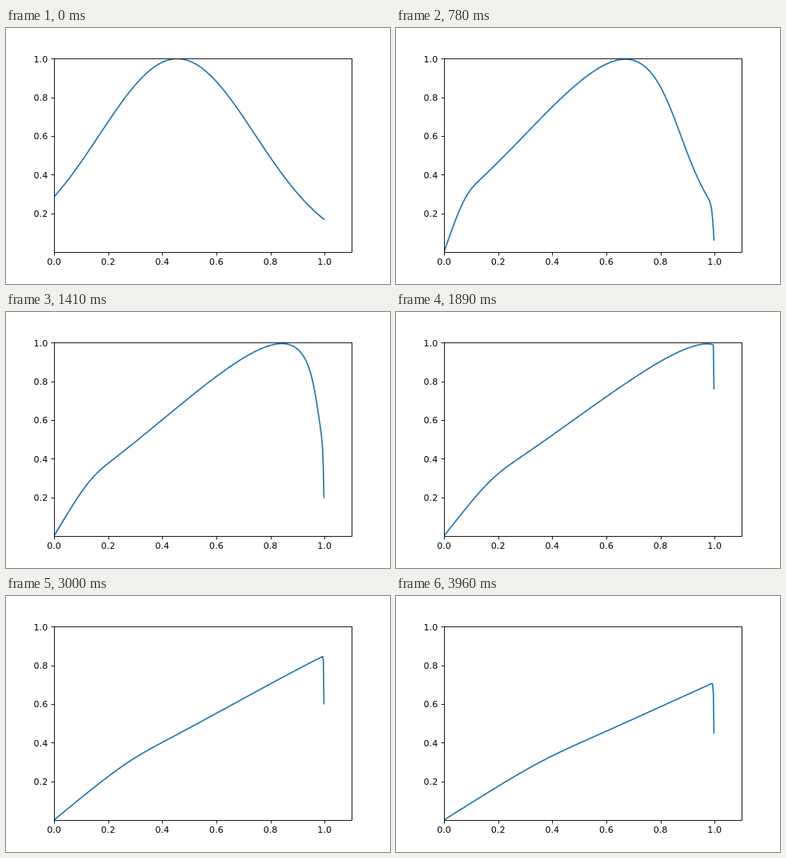
An HTML page with a canvas for the animation above (3990 ms loop, 480 px wide and 320 px high).

```html
<!DOCTYPE html>
<html lang="en">
<head>
<meta charset="utf-8">
<title>Travelling wave</title>
<style>
html, body { margin: 0; width: 480px; height: 320px; overflow: hidden; background: #fff; }
canvas { display: block; }
</style>
</head>
<body>
<canvas id="stage" width="480" height="320"></canvas>
<script>
const ctx = document.getElementById('stage').getContext('2d');
const LEFT = 60, RIGHT = 432, TOP = 38.4, BOTTOM = 280;
const FRAME_MS = 30, FRAMES = 133, FRAME_DT = 0.0083;
const CELLS = 450, H = 1 / CELLS, VISCOSITY = 0.001, SUBSTEPS = 12;

const px = x => LEFT + x * (RIGHT - LEFT) / 1.1;
const py = y => BOTTOM - y * (BOTTOM - TOP);
const snap = v => Math.round(v) + 0.5;

// Viscous Burgers equation, u_t + (u²/2)_x = ν u_xx, with u = 0 at both ends
function rate(u) {
  const r = new Float64Array(CELLS + 1);
  for (let i = 1; i < CELLS; i++) {
    const a = u[i - 1], b = u[i + 1];
    r[i] = (a * a - b * b) / (4 * H) + VISCOSITY * (a - 2 * u[i] + b) / (H * H);
  }
  return r;
}

function advance(u, dt) {
  const k1 = rate(u);
  const k2 = rate(u.map((v, i) => v + dt * k1[i]));
  return u.map((v, i) => v + dt * (k1[i] + k2[i]) / 2);
}

function solve() {
  let u = Float64Array.from({ length: CELLS + 1 }, (_, i) => Math.exp(-((i * H - 0.4557) ** 2) / 0.1655));
  const waves = [u];
  u = u.slice();
  u[0] = u[CELLS] = 0;
  while (waves.length < FRAMES) {
    for (let s = 0; s < SUBSTEPS; s++) u = advance(u, FRAME_DT / SUBSTEPS);
    waves.push(u);
  }
  return waves;
}

function line(x1, y1, x2, y2) {
  ctx.beginPath();
  ctx.moveTo(x1, y1);
  ctx.lineTo(x2, y2);
  ctx.stroke();
}

function drawAxes() {
  ctx.strokeStyle = ctx.fillStyle = '#000';
  ctx.lineWidth = 0.889;
  ctx.strokeRect(LEFT + 0.5, snap(TOP), RIGHT - LEFT, BOTTOM + 0.5 - snap(TOP));
  ctx.font = '11.11px "DejaVu Sans", sans-serif';
  for (let i = 0; i <= 5; i++) {
    const label = (i / 5).toFixed(1), x = px(i / 5), y = py(i / 5);
    ctx.textAlign = 'center';
    ctx.fillText(label, x, 296);
    line(snap(x), BOTTOM + 0.5, snap(x), BOTTOM + 4.4);
    if (!i) continue;
    ctx.textAlign = 'right';
    ctx.fillText(label, 52.2, Math.round(y + 4.2));
    line(LEFT + 0.5, snap(y), LEFT - 3.4, snap(y));
  }
}

function drawWave(u) {
  ctx.save();
  ctx.beginPath();
  ctx.rect(LEFT, TOP, RIGHT - LEFT, BOTTOM - TOP);
  ctx.clip();
  ctx.beginPath();
  for (let i = 0; i < CELLS; i++) ctx.lineTo(px(i * H), py(u[i]));
  ctx.strokeStyle = '#1f77b4';
  ctx.lineWidth = 1.667;
  ctx.lineJoin = 'round';
  ctx.lineCap = 'square';
  ctx.stroke();
  ctx.restore();
}

const waves = solve();
const start = performance.now();

function draw() {
  const frame = Math.floor((performance.now() - start) / FRAME_MS) % FRAMES;
  ctx.fillStyle = '#fff';
  ctx.fillRect(0, 0, 480, 320);
  drawWave(waves[frame]);
  drawAxes();
  requestAnimationFrame(draw);
}
draw();
</script>
</body>
</html>
```
